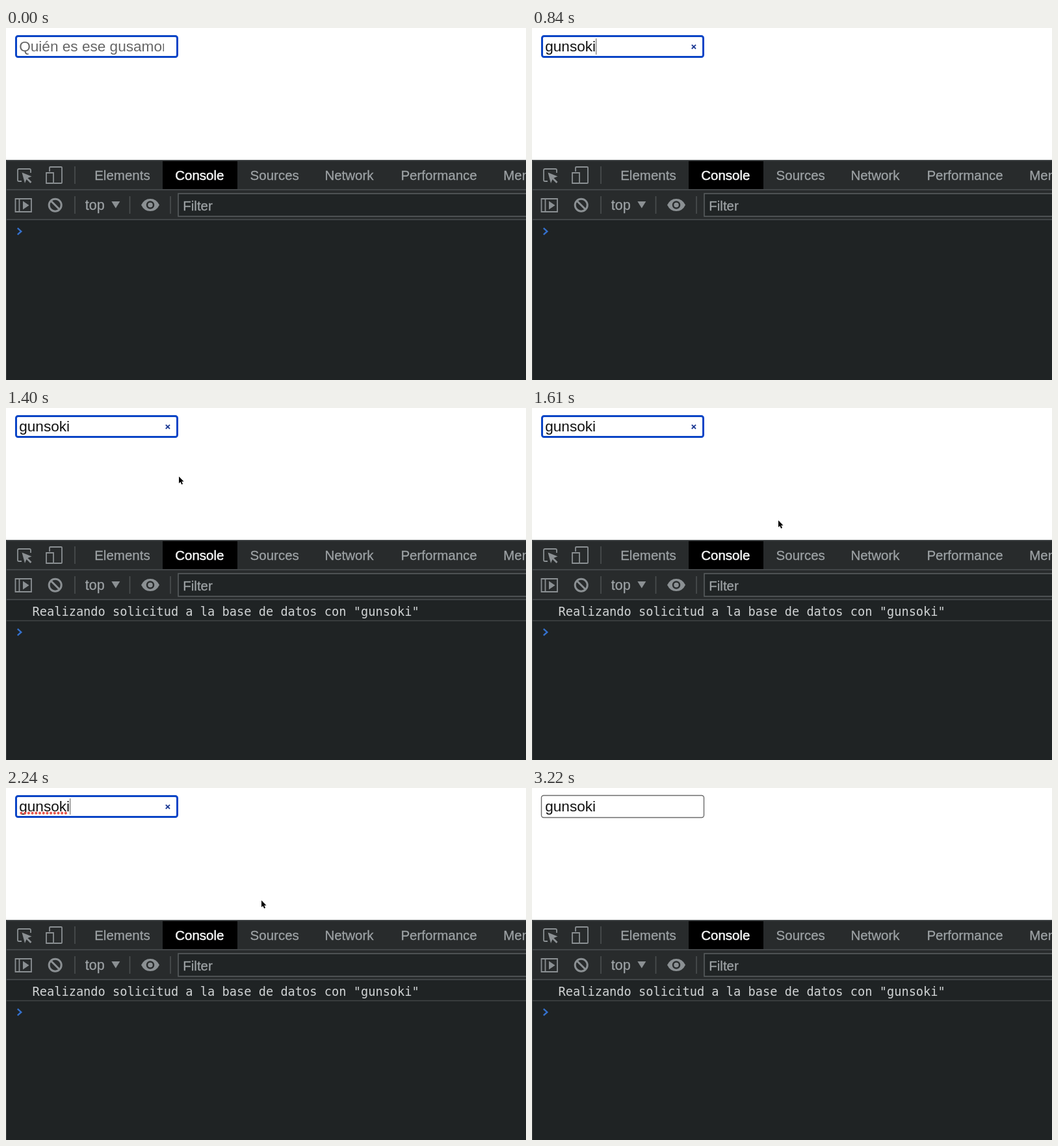
Animation, 800 px wide and 542 px high, one loop 3290 ms. Source, as an HTML page:

```html
<!DOCTYPE html>
<html lang="es">
<head>
<meta charset="utf-8">
<title>Debounced input</title>
<style>
html, body { margin: 0; width: 100%; height: 100%; overflow: hidden; background: #fff; }
svg { display: block; width: 800px; height: 542px; }
text { white-space: pre; }
.ui { font: 20.5px "Liberation Sans", Arial, sans-serif; fill: #9da2a5; stroke: #9da2a5; stroke-width: .3; }
.ui .active { fill: #f6f7f7; stroke: #f6f7f7; stroke-width: .5; }
.field { font: 22.6px "Liberation Sans", Arial, sans-serif; }
.log { font: 18.67px "DejaVu Sans Mono", monospace; fill: #d0d3d4; }
.icon { fill: none; stroke: #8b9093; stroke-width: 1.8; }
.solid { fill: #8b9093; stroke: none; }
.rule { stroke: #4b4f51; stroke-width: 1.6; fill: none; }
</style>
</head>
<body>
<svg viewBox="0 0 800 542">
  <defs><clipPath id="inner"><rect x="18" y="14" width="225" height="30"/></clipPath></defs>
  <rect width="800" height="542" fill="#fff"/>

  <rect id="box" fill="#fff"/>
  <text id="hint" class="field" x="20.2" y="36" fill="#666" clip-path="url(#inner)">Quién es ese gusamor</text>
  <text id="value" class="field" x="20.2" y="36" fill="#111"></text>
  <path id="spell" d="M23.5 38.7H93" fill="none" stroke="#e4554d" stroke-width="4.2" stroke-linecap="round" stroke-dasharray="0 5.7"/>
  <path id="clear" d="M245.8 25.8l6.2 6.2m0-6.2l-6.2 6.2" stroke="#1d3a94" stroke-width="1.8"/>
  <rect id="caret" y="16" width="1.2" height="25" fill="#777"/>

  <rect y="203" width="800" height="339" fill="#1f2324"/>
  <rect y="203" width="800" height="92" fill="#282b2c"/>
  <path class="rule" d="M0 203.800H800M0 249H800M0 295H800"/>
  <path d="M.5 203V542" stroke="#3b3f40"/>
  <rect x="241" y="205" width="115" height="43" fill="#000"/>
  <g id="tabs" class="ui"></g>

  <g class="icon">
    <path d="M24 236h-4q-2 0-2-2v-15q0-2 2-2h16q2 0 2 2v4"/>
    <path class="solid" d="M24.500 222.500l15 6-6 2.500 6 6-2 2-6-6-2.500 6z"/>
    <path d="M67 221v-6q0-1 1-1h17q1 0 1 1v23q0 1-1 1H74M62 223h11v16H62z"/>
    <path class="rule" d="M106 213V240M106 259V286M190.500 259V286M253 259V286"/>
    <path d="M14.500 263h24.500v20H14.500zM20.500 263v20"/>
    <path class="solid" d="M26 266.500l9.500 6.500-9.500 6.500z"/>
    <circle cx="75.700" cy="272.700" r="9.500" stroke-width="3"/>
    <path d="M69.200 266.200l13 13" stroke-width="3"/>
    <path class="solid" d="M162.300 267h13l-6.500 10.500z"/>
    <path class="solid" d="M208 272.500q4.500-9.500 14-9.500t14 9.500q-4.500 9.500-14 9.500t-14-9.500z"/>
    <circle cx="222" cy="272.500" r="5" stroke="#282b2c" stroke-width="2.500"/>
  </g>
  <text class="ui" x="121.800" y="279.700" style="font-size:21.5px">top</text>
  <rect x="265" y="255" width="560" height="35" fill="#202425" stroke="#585c5e" stroke-width="1.600"/>
  <text class="ui" x="272.300" y="280.600">Filter</text>

  <g id="entry">
    <text id="message" class="log" x="40.500" y="320"></text>
    <path d="M0 327.500H800" stroke="#414546" stroke-width="1.500"/>
  </g>
  <path id="prompt" d="M17.800 308.200l5.500 5-5.500 5" fill="none" stroke="#3470cc" stroke-width="2.400"/>

  <path id="pointer" d="M0 0v10.600l2.400-2.200 1.700 4 1.900-.8-1.800-3.800h3.300z" fill="#000" stroke="#fff" stroke-width="1.200" paint-order="stroke"/>
</svg>
<script>
const LOOP = 3290, STEP = 70, WORD = "gunsoki";
const $ = id => document.getElementById(id);
const show = (id, on) => $(id).style.display = on ? "" : "none";
const set = (node, attrs) => {
  for (const key in attrs) node.setAttribute(key, attrs[key]);
};

const TABS = [["Elements", 136.2], ["Console", 260.2], ["Sources", 375.6],
  ["Network", 490.4], ["Performance", 607.4], ["Memory", 765.2]];
for (const [name, x] of TABS) {
  const tab = document.createElementNS("http://www.w3.org/2000/svg", "text");
  tab.textContent = name;
  set(tab, { x, y: 234 });
  if (name === "Console") tab.classList.add("active");
  $("tabs").append(tab);
}
$("message").textContent = `Realizando solicitud a la base de datos con "${WORD}"`;

// [time, letters typed] and [time, x, y]
const KEYS = [[0, 0], [350, 1], [630, 4], [700, 6], [840, 7]];
const PATH = [[1260, 176, 50], [1330, 200, 66], [1610, 379, 173], [2240, 393, 173], [2450, 393, 173]];

function pointerAt(t) {
  const i = PATH.findIndex(p => p[0] > t);
  if (i < 1) return null;
  const [t0, x0, y0] = PATH[i - 1], [t1, x1, y1] = PATH[i];
  const k = 1 - (1 - (t - t0) / (t1 - t0)) ** 1.6;
  return [x0 + (x1 - x0) * k, y0 + (y1 - y0) * k];
}

function draw(t) {
  const focused = t < 3080, logged = t >= 1400;
  const typed = KEYS.filter(k => k[0] <= t).pop()[1];
  const value = $("value");
  value.textContent = WORD.slice(0, typed);
  show("hint", !typed);
  show("clear", typed && focused);
  show("spell", t >= 1960 && focused);

  const blinkOn = t < 840 ? t >= STEP : Math.floor((t - 840) / 530) % 2 === 0;
  show("caret", focused && blinkOn);
  set($("caret"), { x: 20.2 + value.getComputedTextLength() });
  set($("box"), focused
    ? { x: 15.5, y: 12.5, width: 248, height: 32, rx: 3, stroke: "#0a44c6", "stroke-width": 3 }
    : { x: 14.5, y: 11.5, width: 250, height: 34, rx: 3.5, stroke: "#6b6b6b", "stroke-width": 1.4 });

  show("entry", logged);
  set($("prompt"), { transform: `translate(0 ${logged ? 32 : 0})` });

  const at = pointerAt(t);
  show("pointer", at);
  if (at) set($("pointer"), { transform: `translate(${at})` });
}

function tick() {
  const t = performance.now() % LOOP;
  draw(Math.floor(t / STEP) * STEP);
  requestAnimationFrame(tick);
}
tick();
</script>
</body>
</html>
```
